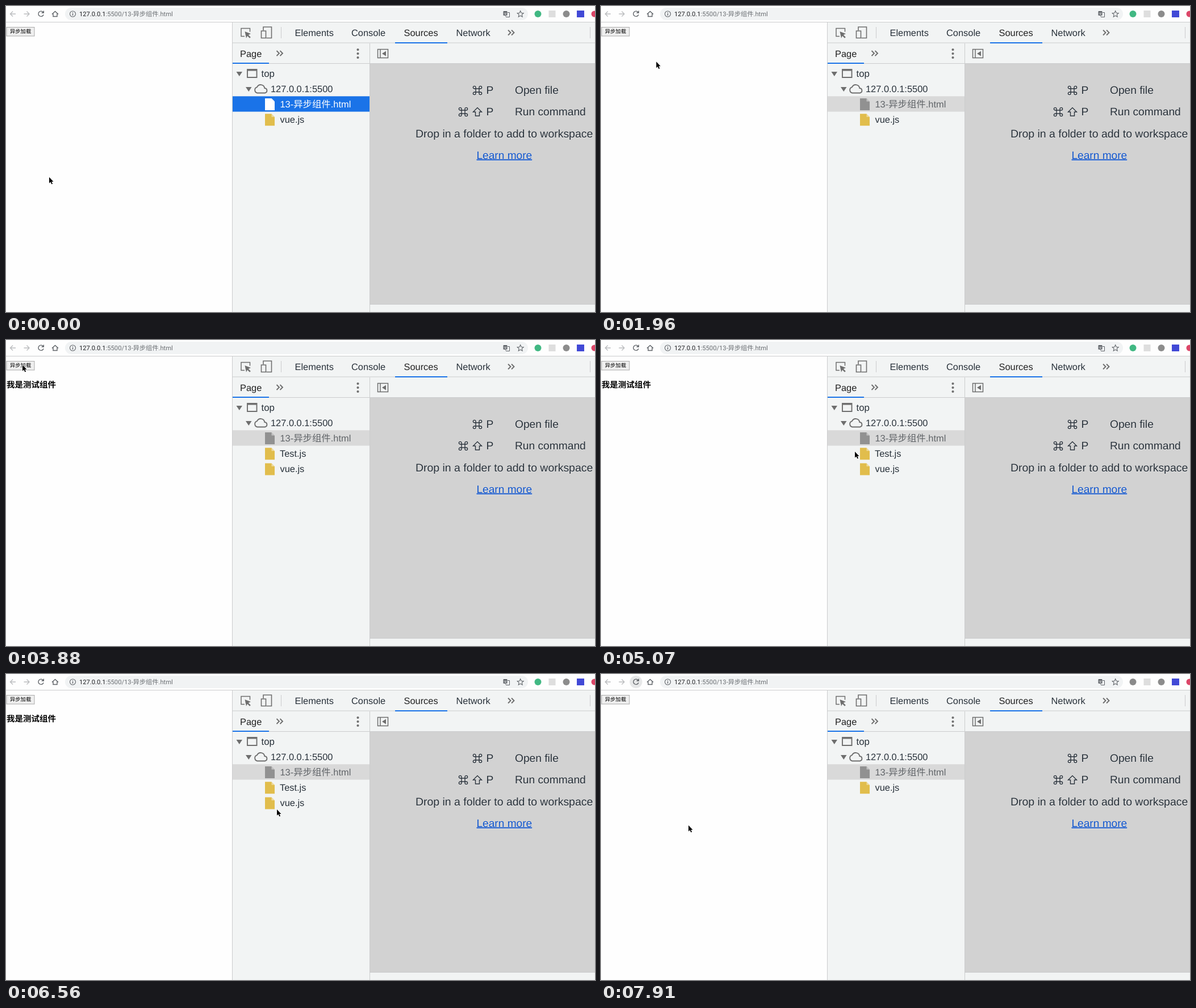
Write an HTML page that moves like this. It is 1037 px wide and 540 px high and loops after 8 s.

```html
<!DOCTYPE html>
<html lang="zh">
<head>
<meta charset="utf-8">
<style>
  html, body { margin: 0; width: 100%; height: 100%; overflow: hidden; background: #fff; }
  svg { display: block; }
  text { font: 16.4px "Liberation Sans", Arial, "Noto Sans CJK SC", "Noto Sans CJK", sans-serif; fill: #28313a; white-space: pre; text-rendering: geometricPrecision; }
  .line { fill: none; stroke: #5f6368; stroke-width: 1.4; }
  .heavy { stroke: #6e6e6e; stroke-width: 1.9; }
  .pale { stroke: #babcbe; }
  .rule { stroke: #cbcccd; fill: none; }
  .blue { fill: #1a73e8; }
  .hint text { font-size: 19.2px; }
  .hint { filter: drop-shadow(0 1px 0 rgba(255, 255, 255, .5)); }
  .key { fill: none; stroke: #28313a; stroke-width: 1.4; }
</style>
</head>
<body>
<svg width="1037" height="540" viewBox="0 0 1037 540">
  <defs>
    <g id="file"><path d="M456 163h11.500l5.500 5.500v15.500h-17z"/><path d="M467.500 163v5.500h5.500z" fill="#fff" opacity=".45"/></g>
    <path id="more" d="M0 0l4.500 4.500L0 9M6 0l4.500 4.500L6 9"/>
    <path id="command" d="M5 5V2.700A2.300 2.300 0 1 0 2.700 5H13.300A2.300 2.300 0 1 0 11 2.700V13.300A2.300 2.300 0 1 0 13.300 11H2.700A2.300 2.300 0 1 0 5 13.300Z"/>
  </defs>

  <!-- browser bar -->
  <rect width="1037" height="540" fill="#fefefe"/>
  <rect x="104" y="3" width="815" height="22" rx="11" fill="#f1f3f4"/>
  <path class="rule" d="M0 28.500H1037"/>
  <circle id="reloadHover" cx="61.500" cy="14" r="11" fill="#e6e7e8"/>
  <path class="line pale" d="M17 14H7.500M12 9.500L7.500 14l4.500 4.500M31.500 14H41M36.500 9.500L41 14l-4.500 4.500"/>
  <path class="line" d="M65.300 11A4.600 4.600 0 1 0 66 15.200M66.300 8.500V12H62.600M81 14.500L86.500 9.500 92 14.500M83 13.500V18.500H90V13.500"/>
  <circle class="line" cx="117.500" cy="14" r="5" style="stroke-width:1.1"/>
  <path class="line" d="M117.500 13.300v3.400M117.500 11v1.300"/>
  <text x="129" y="17.800" style="font: 11.2px Roboto, 'Noto Sans CJK SC', 'Noto Sans CJK', sans-serif"><tspan fill="#202124">127.0.0.1</tspan><tspan fill="#6b6f73">:5500/13-异步组件.html</tspan></text>
  <rect x="875.500" y="9" width="7" height="8" rx="1" fill="#5f6368"/>
  <path class="line" style="stroke-width:1" d="M883 11.500h3.500v8h-6l-1-2"/>
  <text x="876" y="15.500" style="font-size:6px;fill:#fff">文</text>
  <path class="line" style="stroke-width:1.1" d="M905.700 8.600l1.600 3.600 3.900.4-2.900 2.600.8 3.900-3.400-2-3.400 2 .8-3.900-2.900-2.600 3.900-.4z"/>
  <circle id="badge" cx="936.500" cy="14" r="6"/>
  <rect x="955.500" y="8" width="12" height="12" fill="#dedede"/>
  <circle cx="986.500" cy="14" r="6" fill="#8c8c8c"/>
  <rect x="1005" y="8" width="13" height="12" fill="#4149d6"/>
  <circle cx="1036" cy="14" r="5.500" fill="#dc4668"/>

  <!-- page -->
  <g id="button">
    <rect id="buttonFace" x="1" y="37.500" width="49" height="15.500" stroke="#a9a9a9"/>
    <text x="7" y="48.300" style="font-size:9.3px;fill:#000">异步加载</text>
  </g>
  <text id="heading" x="1" y="84" style="font-size:14.5px;font-weight:bold;fill:#000">我是测试组件</text>

  <!-- developer tools -->
  <rect x="399" y="29" width="638" height="511" fill="#f2f4f4"/>
  <rect x="641" y="102" width="396" height="424" fill="#d2d2d2"/>
  <path class="rule" d="M398.500 29V540M399 65H1037M399 101.500H1037M640.500 66V540M641 526.500H1037M484.500 37V57M1028.500 37V57"/>
  <path class="blue" d="M685 64h92v2h-92zM399 100h64v2h-64z"/>
  <path class="line heavy" style="stroke-width:1.5" d="M420 53.500h-6v-14h15.500v6"/>
  <path d="M420.500 45l10.500 4-4.200 2 4 4-1.800 1.700-4-4-2 4z" fill="#6e6e6e"/>
  <path class="line heavy" style="stroke-width:1.6" d="M453 43v-6h14.500v19.500h-9M449.500 44h8v12.500h-8z"/>
  <text x="508.500" y="53">Elements</text>
  <text x="608" y="53">Console</text>
  <text x="700.500" y="53" style="fill:#222">Sources</text>
  <text x="792.500" y="53">Network</text>
  <use href="#more" x="884" y="42.500" class="line heavy"/>
  <text x="412" y="89.500" style="fill:#222">Page</text>
  <use href="#more" x="476.500" y="79" class="line heavy"/>
  <path d="M619.500 77v.01M619.500 84v.01M619.500 91v.01" stroke="#6e6e6e" stroke-width="4.200" stroke-linecap="round"/>
  <path class="line heavy" style="stroke-width:1.5" d="M654.500 76.500h18v15h-18zM659 76.500v15"/>
  <path d="M669 79.500v9l-7-4.500z" fill="#6e6e6e"/>

  <path d="M405.500 116h10.500l-5.200 8zM422 143h10.500l-5.200 8z" fill="#6e6e6e"/>
  <path class="line heavy" d="M425 112h16.500v14H425zM425 113.500h16.500"/>
  <path class="line heavy" d="M442.500 153.500a5.300 5.300 0 0 1-.5-10.300 7 7 0 0 1 13.300 1.800 4.300 4.300 0 0 1 .7 8.500z"/>
  <text x="449.500" y="124.500" style="font-size:16.800px">top</text>
  <text x="466" y="151.500">127.0.0.1:5500</text>
  <rect id="selection" x="399" y="159.300" width="241" height="27.200"/>
  <rect id="rowHover" x="399" width="241" height="27.200" fill="#dfe5f0"/>
  <use id="pageIcon" href="#file"/>
  <text id="pageName" x="482.500" y="179">13-异步组件.html</text>
  <g id="testRow"><use href="#file" y="27.200" fill="#e1bd4c"/><text x="482" y="206">Test.js</text></g>
  <g id="vueRow"><use href="#file" y="27.200" fill="#e1bd4c"/><text x="482.500" y="206">vue.js</text></g>

  <g class="hint">
    <use href="#command" class="key" x="822" y="141"/><text x="845.500" y="155">P</text><text x="896" y="155">Open file</text>
    <use href="#command" class="key" x="797" y="179"/><path class="key" d="M830 179.500l7.500 7.500h-4v7h-7v-7h-4z"/><text x="845.500" y="193">P</text><text x="896" y="193">Run command</text>
    <text x="721" y="231.500" style="font-size:19.45px">Drop in a folder to add to workspace</text>
    <text x="828.500" y="269.500" style="font-size:19.1px;fill:#1155cc;text-decoration:underline">Learn more</text>
  </g>

  <g id="tip" style="filter:drop-shadow(0 1px 1.5px rgba(0,0,0,.35))">
    <rect width="227" height="33" fill="#f6f6f6" stroke="#b4b4b4"/>
    <text id="tipText" x="10.800" y="22" style="font-size:16.6px;fill:#262626"></text>
  </g>
  <path id="cursor" d="M0 0V10.800L2.500 8.600 4.300 12.600 6.100 11.800 4.300 7.900H7.500Z" stroke="#fff" stroke-width="1.200" paint-order="stroke"/>
</svg>
<script>
const LOOP = 8000;
// pointer waypoints: step, x, y
const path = [
  [-4, 76, 302], [-3, 82, 255], [-2, 78, 204], [0, 66, 135], [2, 39, 17], [4, 61, 13], [6, 62, 14],
  [7, 75, 40], [10, 142, 215], [11, 147, 236], [13, 147, 236], [14, 141, 220],
  [17, 36, 60], [18, 29, 44], [23, 29, 44], [24, 55, 62], [26, 270, 150], [28, 420, 192],
  [29, 447, 197], [31, 458, 190], [34, 500, 211], [36, 515, 237], [37, 513, 239], [39, 477, 239],
  [41, 390, 185], [44, 110, 38], [45, 66, 17], [46, 62, 14], [47, 95, 110], [48, 154, 267]
];
const el = id => document.getElementById(id);
const set = (id, name, value) => el(id).setAttribute(name, value);
const show = (id, on) => set(id, "visibility", on ? "visible" : "hidden");

const stepAt = t => t < 300 ? -4 : t < 480 ? -3 : t < 775 ? -2 : Math.floor((t - 765) / 148.2);

function pointer(step) {
  const i = path.findIndex(p => p[0] >= step);
  if (i < 0) return path.at(-1).slice(1);
  if (i === 0) return path[0].slice(1);
  const [a, b] = [path[i - 1], path[i]], f = (step - a[0]) / (b[0] - a[0]);
  return [1, 2].map(n => a[n] + (b[n] - a[n]) * f);
}

function draw(t) {
  const step = stepAt(t), within = (from, to) => step >= from && step < to;
  const selected = step === -4, loaded = within(20, 48);
  const onTest = within(30, 35), onVue = within(35, 39);

  set("cursor", "transform", `translate(${pointer(step)})`);
  show("reloadHover", within(4, 7) || step >= 45);
  set("badge", "fill", within(6, 8) || step >= 48 ? "#8a8a8a" : "#41b883");
  show("button", step !== 7);
  set("buttonFace", "fill", step === 19 ? "#d8d8d8" : "#efefef");
  show("heading", loaded);

  set("selection", "fill", selected ? "#1a73e8" : "#d9d9d9");
  set("pageIcon", "fill", selected ? "#fff" : "#919191");
  el("pageName").style.fill = selected ? "#fff" : "#606468";
  show("testRow", loaded);
  set("vueRow", "transform", `translate(0 ${loaded ? 27.2 : 0})`);
  show("rowHover", onTest || onVue);
  set("rowHover", "y", onTest ? 186.5 : 213.7);

  show("tip", within(31, 35) || within(37, 39));
  set("tip", "transform", onTest ? "translate(458 211)" : "translate(513.5 265)");
  el("tipText").textContent = "http://127.0.0.1:5500/" + (onTest ? "Test.js" : "vue.js");
}

function frame() {
  draw(performance.now() % LOOP);
  requestAnimationFrame(frame);
}
frame();
</script>
</body>
</html>
```
